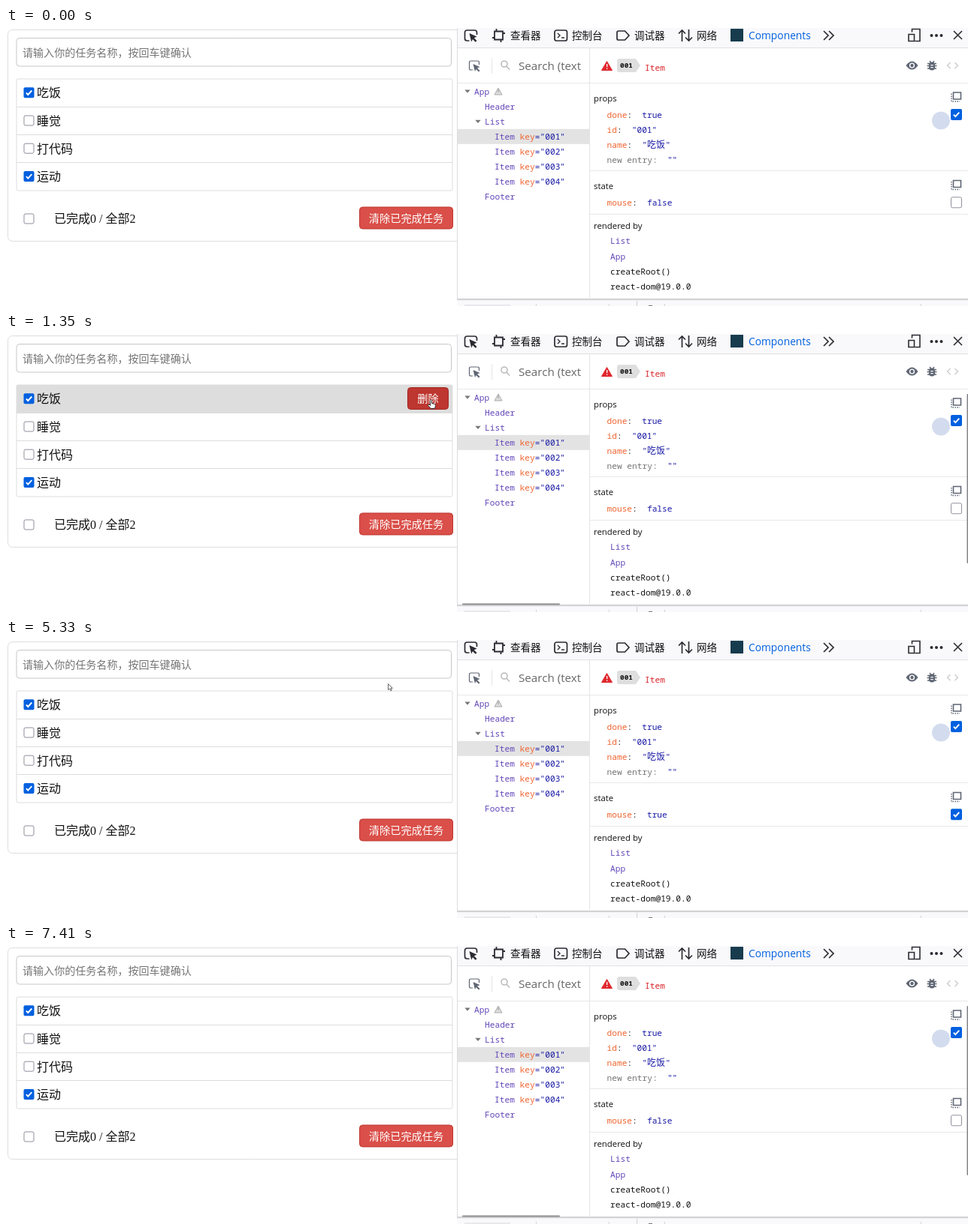
An HTML page with a canvas that plays this animation: 1280 by 371 pixels, repeating every 7.66 s.

```html
<!DOCTYPE html>
<html lang="zh">
<head>
<meta charset="utf-8">
<style>
html, body { margin: 0; width: 100%; height: 100%; overflow: hidden; background: #fff; }
canvas { display: block; }
</style>
</head>
<body>
<canvas id="stage" width="1280" height="371"></canvas>
<script>
const ctx = document.getElementById('stage').getContext('2d');
const LOOP = 7660;
const CJK = '"Noto Sans CJK SC", "Noto Sans CJK", sans-serif';
const UI = '"Open Sans", ' + CJK;
const MONO = '"Noto Sans Mono", "Noto Sans CJK SC", monospace';
const SERIF = '"Liberation Serif", "Noto Sans CJK SC", serif';
const CODE = '11.2px ' + MONO;
const INK = '#2b2b33', PURPLE = '#6246b8', ORANGE = '#ef6632', BLUE = '#1a1aa6';

// Bursts of pointer movement: start, end, number of steps
const bursts = [
  [480, 1180, 9], [1260, 1420, 3], [2660, 2920, 4], [3590, 4160, 8],
  [4820, 5330, 7], [5920, 6090, 3], [6420, 7160, 10], [7250, 7410, 3]
];
// Pointer path: time, x, y
const path = [
  [480, 1262, 345], [917, 705, 126], [1005, 669, 110], [1092, 652, 88], [1180, 640, 85],
  [1260, 575, 88], [1420, 556, 87], [2660, 583, 75], [2920, 590, 58],
  [3590, 578, 62], [4160, 495, 89], [4820, 496, 86], [5330, 508, 58],
  [5920, 530, 56], [6090, 592, 56], [6420, 640, 84], [6502, 725, 122],
  [6584, 1185, 244], [7160, 1250, 341], [7410, 1268, 360]
];

const within = (t, a, b) => t >= a && t < b;

function snap(t) {
  let time = 0;
  for (const [start, end, steps] of bursts) {
    if (t < start) break;
    const dt = (end - start) / (steps - 1);
    time = Math.min(end, start + Math.floor((t - start) / dt + 1e-6) * dt);
  }
  return time;
}

function pointerAt(t) {
  const i = Math.max(1, path.findIndex(p => p[0] >= t));
  const [t0, x0, y0] = path[i - 1], [t1, x1, y1] = path[i];
  const k = (t - t0) / (t1 - t0);
  return { x: x0 + (x1 - x0) * k, y: y0 + (y1 - y0) * k };
}

function rect(x, y, w, h, color) {
  ctx.fillStyle = color;
  ctx.fillRect(x, y, w, h);
}

function box(x, y, w, h, r, fill, stroke, width = 1) {
  ctx.beginPath();
  ctx.roundRect(x, y, w, h, r);
  if (fill) { ctx.fillStyle = fill; ctx.fill(); }
  if (stroke) { ctx.strokeStyle = stroke; ctx.lineWidth = width; ctx.stroke(); }
}

function text(str, x, y, font, color, align = 'left') {
  ctx.font = font;
  ctx.fillStyle = color;
  ctx.textAlign = align;
  ctx.fillText(str, x, y);
}

function draw(d, x, y, stroke, width = 1.6, fill) {
  const shape = new Path2D(d);
  ctx.save();
  ctx.translate(x, y);
  if (fill) { ctx.fillStyle = fill; ctx.fill(shape); }
  if (stroke) { ctx.strokeStyle = stroke; ctx.lineWidth = width; ctx.stroke(shape); }
  ctx.restore();
}

function dot(x, y, r, color) {
  ctx.fillStyle = color;
  ctx.beginPath();
  ctx.arc(x, y, r, 0, Math.PI * 2);
  ctx.fill();
}

function checkbox(cx, cy, checked, size = 14) {
  const h = size / 2;
  if (checked) {
    box(cx - h, cy - h, size, size, 2, '#0060df');
    draw('M-3.6 .2L-1.2 2.7L3.8 -2.8', cx, cy, '#fff', 1.9);
  } else {
    box(cx - h + .5, cy - h + .5, size - 1, size - 1, 2, '#fff', '#8f8f9d');
  }
}

function button(x, y, w, label, hot) {
  box(x + .5, y + .5, w - 1, 29, 4, hot ? '#bd362f' : '#da4f49', hot ? '#a42a25' : '#bd362f');
  text(label, x + w / 2, y + 20.3, '14.2px ' + CJK, '#fff', 'center');
}

function page(p) {
  const overRow = p && p.x >= 14 && p.x < 594 && p.y >= 68 && p.y < 105;
  box(2.5, 2.5, 640, 282, 6, '#fff', '#ddd');
  box(14, 13.5, 578.5, 37.5, 4, '#fff', '#c8c8c8');
  text('请输入你的任务名称，按回车键确认', 22, 38, '14.05px ' + CJK, '#757575');

  box(14, 68, 580, 149, 2, '#fff', '#ddd');
  if (overRow) rect(14, 68, 580, 37, '#ddd');
  [['吃饭', true], ['睡觉', false], ['打代码', false], ['运动', true]].forEach(([name, done], i) => {
    const y = 86.3 + i * 37.2;
    if (i) rect(14, Math.round(67.6 + i * 37.2), 580, 1, '#ddd');
    checkbox(30.5, y, done);
    text(name, 41, y + 6, '16px ' + SERIF, '#111');
  });
  if (overRow) button(534, 71, 55, '删除', p.x >= 534 && p.x < 589 && p.y >= 71);

  checkbox(30.5, 254.5, false);
  text('已完成0 / 全部2', 64, 260, '16px ' + SERIF, '#111');
  button(470, 238.5, 125, '清除已完成任务');
}

function overlay(name, size, x, y, w, h, tipY, margin = 0) {
  if (margin) {
    rect(x, y - margin, w, margin, 'rgba(255,155,0,.3)');
    rect(x, y + h, w, margin, 'rgba(255,155,0,.3)');
  }
  rect(x, y, w, h, 'rgba(120,170,210,.7)');
  ctx.strokeStyle = 'rgba(160,170,140,.45)';
  ctx.lineWidth = 1;
  ctx.strokeRect(x + .5, y + .5, w - 1, h - 1);

  const font = 'bold 11.1px ' + MONO, step = 6.67;
  const split = 23 + name.length * step + 8;
  box(18.5, tipY, split - 18 + size.length * step + 13, 20, 2, '#333740');
  text(name, 23, tipY + 14, font, '#ee78e6');
  rect(Math.round(split), tipY + 4, 1, 13, '#aaa');
  text(size, split + 9, tipY + 14, font, '#d7d7d7');
}

function toolbar() {
  rect(600, 0, 680, 26, '#f9f9fb');
  rect(600, 26, 680, 1, '#e0e0e2');

  draw('M-2 7H-5Q-8 7 -8 4V-4Q-8 -7 -5 -7H5Q8 -7 8 -4V-1', 618.5, 10, INK, 1.7);
  draw('M-2 -3L8 1.5L4.3 3.2L8 7L6.2 8.8L2.5 5L.7 8.5Z', 618.5, 10, null, 0, INK);
  draw('M-5.5 -5.5H5.5V5.5H-5.5ZM-3 -9V-6M3 6V9M-8.5 3H-6M6 -3H8.5', 655.5, 10, INK, 1.8);
  box(730, 3, 16.5, 14, 2.5, null, INK, 1.7);
  draw('M-4 -3L-1 0L-4 3M1 3H5', 738, 10, INK, 1.4);
  draw('M-8 -4Q-8 -6 -6 -6H2.5L8 0L2.5 6H-6Q-8 6 -8 4Z', 821, 10, INK, 1.7);
  draw('M-4.5 8V-7M-9 -2.5L-4.5 -7L0 -2.5M4.5 -8V7M0 2.5L4.5 7L9 2.5', 904, 10, INK, 1.7);
  rect(964, 1, 17, 17, '#173c4e');
  draw('M-6 -6L0 0L-6 6M1 -6L7 0L1 6', 1094, 10, INK, 1.7);
  draw('M-3 -4V-8H7.5V8H1M-7.5 -1H0V8H-7.5Z', 1208.5, 9.5, INK, 1.6);
  [-6.5, 0, 6.5].forEach(dx => dot(1238 + dx, 10, 2, INK));
  draw('M-5.5 -5.5L5.5 5.5M5.5 -5.5L-5.5 5.5', 1266.5, 9.5, INK, 1.6);

  const tab = '13.5px ' + CJK;
  [['查看器', 671], ['控制台', 753], ['调试器', 836], ['网络', 919]]
    .forEach(([label, x]) => text(label, x, 15, tab, '#111116'));
  text('Components', 988, 14.5, '13.8px ' + UI, '#0060df');
}

function tree(hovered) {
  draw('M-2 6H-4.5Q-6.5 6 -6.5 4V-4Q-6.5 -6 -4.5 -6H4.5Q6.5 -6 6.5 -4V-1', 623, 50, '#5f6673', 1.2);
  draw('M-1.5 -2L7.5 2L4 3.5L7.5 7L6 8.5L2.5 5L1 8Z', 623, 50, null, 0, '#5f6673');
  rect(646, 40, 1, 21, '#e6e6e6');
  draw('M3 -1.5A4 4 0 1 1 -5 -1.5A4 4 0 1 1 3 -1.5M2 1.8L6.2 6', 664, 49.5, '#bbb', 1.6);
  text('Search (text', 682, 56, '15.2px ' + UI, '#686868');
  rect(601, 73, 679, 1, '#e8e8e8');

  const rows = [['App', 623], ['Header', 637], ['List', 637], ['001', 650], ['002', 650],
    ['003', 650], ['004', 650], ['Footer', 637]];
  rows.forEach(([name, x], i) => {
    const y = 84.5 + i * 20.1;
    if (name === '001') rect(601, y - 10, 175, 20, '#e3e3e3');
    else if (name === hovered) rect(601, y - 10, 175, 20, '#e3f2fc');
    if (+name) {
      text('Item', x, y + 4, CODE, PURPLE);
      text('key', x + 33.6, y + 4, CODE, ORANGE);
      text(`="${name}"`, x + 53.8, y + 4, CODE, BLUE);
    } else {
      text(name, x, y + 4, CODE, PURPLE);
    }
    if (name === 'App' || name === 'List') {
      draw('M-3.7 -2H3.7L0 2.3Z', x - 9, y, null, 0, '#777');
    }
  });
  draw('M0 -4.5L5 4.5H-5Z', 655, 84.5, '#aaa', 1, '#ddd');
  rect(654.5, 82, 1, 4, '#999');
}

function field(key, value, y, muted) {
  const step = 6.74;
  text(key, 799.5, y, CODE, muted ? '#777' : ORANGE);
  text(':', 799.5 + key.length * step, y, CODE, muted ? '#777' : '#222');
  text(value, 799.5 + (key.length + 1) * step + 13, y, CODE, BLUE);
}

function copyIcon(y) {
  box(1260.5, y - 5.5, 10, 9, 0, '#fff', '#5f6673', 1.6);
  ctx.setLineDash([1.5, 1.5]);
  draw('M-6 -4V6.5H5', 1264, y, '#5f6673', 1.4);
  ctx.setLineDash([]);
}

function details(mouse) {
  rect(776, 27, 1, 333, '#e4e4e4');
  draw('M0 -6L7 6H-7Z', 799.5, 50.5, '#e0282e', 1, '#e0282e');
  rect(799, 48, 1.3, 4, '#fff');
  rect(799, 53.5, 1.3, 1.5, '#fff');
  draw('M3 0H25L31 9L25 18H3Q0 18 0 15V3Q0 0 3 0Z', 813, 41, null, 0, '#dedede');
  text('001', 817, 53.3, 'bold 9.4px ' + MONO, '#111');
  text('Item', 850, 57, CODE, '#d9262c');

  draw('M-8 0Q-4 -5.5 0 -5.5Q4 -5.5 8 0Q4 5.5 0 5.5Q-4 5.5 -8 0Z', 1205.5, 50, null, 0, '#5f6673');
  dot(1205.5, 50, 3.6, '#fff');
  dot(1205.5, 50, 2.2, '#5f6673');
  draw('M-6 -3H6M-6.5 0H6.5M-6 3.5H6M-3 -6.5L-1 -4M3 -6.5L1 -4', 1232, 50.5, '#5f6673', 1.5);
  box(1228, 45.5, 8, 11, 4, '#5f6673');
  rect(1230.3, 49, 3.4, 1.2, '#fff');
  rect(1230.3, 52, 3.4, 1.2, '#fff');
  draw('M-3 -4L-7 0L-3 4M3 -4L7 0L3 4', 1259.5, 50, '#ccc', 1.4);

  const title = '11.4px ' + UI;
  text('props', 782, 97.5, title, '#111');
  field('done', 'true', 120);
  field('id', '"001"', 140);
  text('name', 799.5, 160, CODE, ORANGE);
  text(':', 826.5, 160, CODE, '#222');
  text('"', 846.5, 160, CODE, BLUE);
  text('吃饭', 853, 160.3, '12px ' + CJK, BLUE);
  text('"', 877.5, 160, CODE, BLUE);
  field('new entry', '""', 180, true);
  dot(1244, 123.5, 12, '#d3dcee');
  copyIcon(91.5);
  checkbox(1264.5, 115.5, true, 15);
  rect(777, 190, 503, 1, '#e8e8e8');

  text('state', 782, 214.5, title, '#111');
  field('mouse', String(mouse), 237);
  copyIcon(209);
  checkbox(1264.5, 232.8, mouse, 15);
  rect(777, 248, 503, 1, '#e8e8e8');

  text('rendered by', 782, 268, title, '#111');
  text('List', 804, 288, CODE, PURPLE);
  text('App', 804, 309, CODE, PURPLE);
  text('createRoot()', 804, 329, CODE, '#111');
  text('react-dom@19.0.0', 804, 349, CODE, '#111');
}

function devtools(t, mouse, hovered) {
  rect(600, 0, 680, 371, '#fff');
  toolbar();
  tree(hovered);
  details(mouse);
  rect(600, 0, 1, 362, '#dcdcdc');
  rect(600, 361, 680, 2.5, '#d2d2d4');
  rect(600, 363.5, 680, 8, '#f9f9fb');
  rect(610, 369, 61, 2, '#e9e9ec');
  [705, 802, 876, 1217].forEach(x => rect(x, 368, 1, 3, '#d4d4d8'));
  rect(839, 364, 1, 7, '#d0d0d4');
  rect(855, 370, 5, 1, '#777');
  if (within(t, 567, 3750) || t >= 6660) {
    box(607, 359.5, 130, 2, 1, '#909090');
    box(1278.5, 80, 2, 226, 1, '#85858a');
  }
}

function pointer({ x, y }) {
  const hand = x >= 534 && x < 589 && y >= 71 && y < 101;
  if (hand) {
    draw('M-1 1Q0 -1 1 1V5L5 6Q6 6 6 8L5 12H0L-4 8Q-4 6 -2 7L-1 8Z', x, y, '#333', 1, '#fff');
  } else {
    draw('M0 0V8L2 6.4L3.4 9.3L4.7 8.7L3.4 5.8H5.8Z', x + .5, y + .5, '#666', 1, '#fff');
  }
}

function render(now) {
  const t = now % LOOP;
  const visible = within(t, 480, 7409);
  const p = visible ? pointerAt(snap(t)) : null;
  const mouse = within(t, 1910, 2915) || within(t, 3990, 5920);
  const hovered = within(t, 917, 1004) || within(t, 6500, 6664) ? 'List'
    : within(t, 1090, 1260) || within(t, 6420, 6500) ? 'App' : '';

  rect(0, 0, 1280, 371, '#fff');
  page(p);
  if (within(t, 1004, 1090)) overlay('List', '578px × 181px', 14, 68, 580, 149, 239, 16);
  if (within(t, 1090, 1179) || within(t, 6420, 6500)) overlay('App', '600px × 283px', 2, 2, 598, 283, 289);
  if (within(t, 6500, 6664)) overlay('Header', '578px × 38px', 13, 13, 582, 38, 56.5);
  devtools(t, mouse, hovered);
  if (p) pointer(p);
  requestAnimationFrame(tick);
}

let origin;
function tick(now) {
  origin ??= now;
  render(now - origin);
}
requestAnimationFrame(tick);
</script>
</body>
</html>
```
